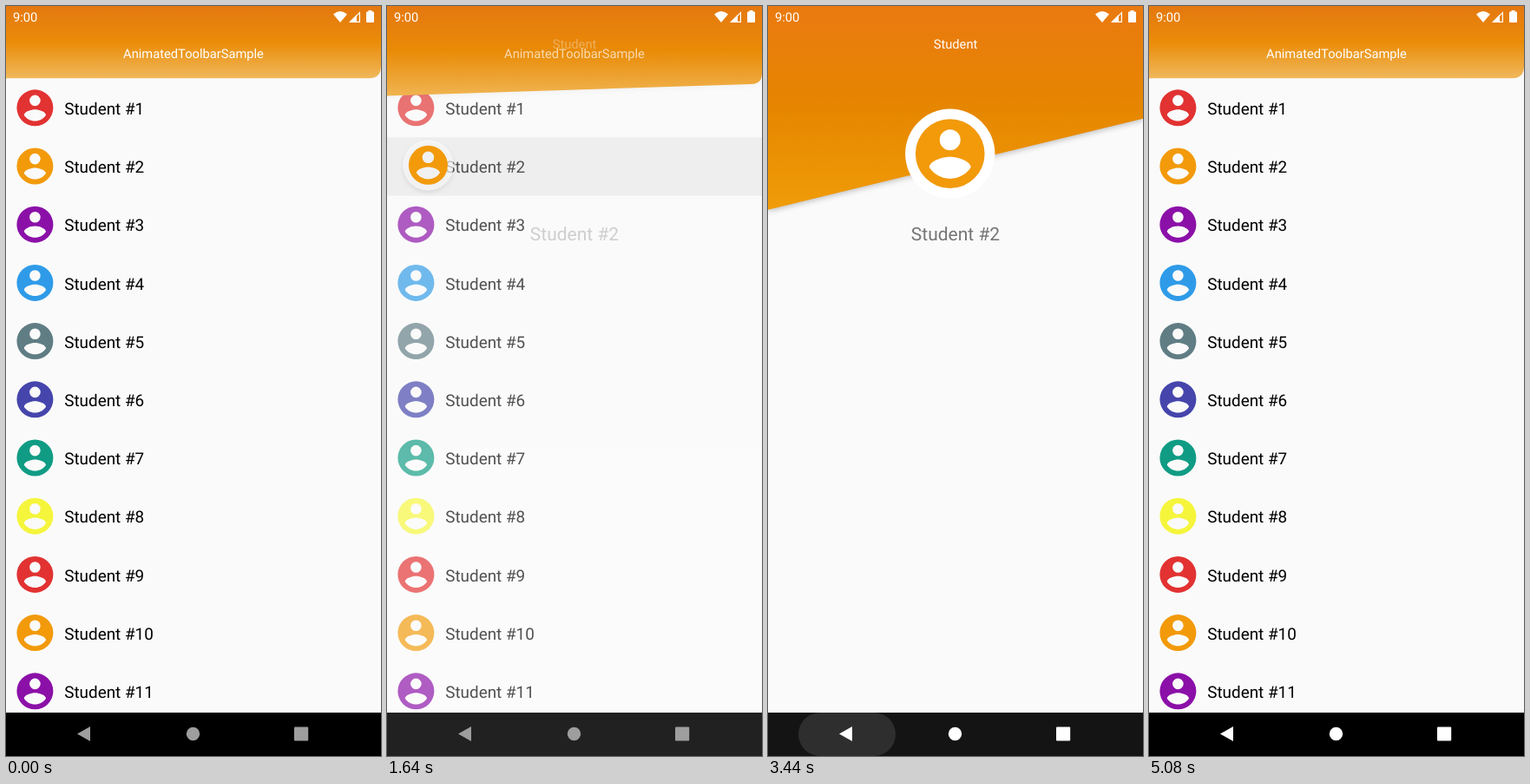
An HTML page for the animation above (5120 ms loop, 432 by 864 pixels).

```html
<!DOCTYPE html>
<html lang="en">
<head>
<meta charset="utf-8">
<title>Animated toolbar</title>
<style>
  html, body { margin: 0; width: 100%; height: 100%; overflow: hidden; background: #000; }
  svg { display: block; width: 100%; height: 100%; }
  text { font-family: Roboto, "Noto Sans", sans-serif; text-rendering: geometricPrecision; }
  .mid { text-anchor: middle; }
  .bar { font-size: 14.7px; fill: #fff; }
</style>
</head>
<body>
<svg viewBox="0 0 432 864" xmlns="http://www.w3.org/2000/svg">
  <defs>
    <linearGradient id="paint" x1="0" y1="0" x2="0" y2="1">
      <stop id="top"/><stop id="middle" offset=".5"/><stop id="bottom" offset="1"/>
    </linearGradient>
    <filter id="headerBlur" x="-10%" y="-20%" width="120%" height="140%"><feGaussianBlur stdDeviation="3"/></filter>
    <filter id="avatarBlur" x="-30%" y="-30%" width="160%" height="160%"><feGaussianBlur stdDeviation="1.2"/></filter>
    <clipPath id="rowClip"><rect y="151.2" width="432" height="67.2"/></clipPath>
    <path id="person" fill-rule="evenodd" d="M0-10A10 10 0 1 1 0 10A10 10 0 1 1 0-10ZM0-7A3 3 0 1 0 0-1A3 3 0 1 0 0-7ZM0 7.2C2.5 7.2 4.71 5.92 6 3.98C5.97 1.99 1.99.9 0 .9C-2 .9-5.97 1.99-6 3.98C-4.71 5.92-2.5 7.2 0 7.2Z"/>
  </defs>

  <rect width="432" height="864" fill="#fafafa"/>
  <g clip-path="url(#rowClip)"><circle id="ripple"/></g>
  <g id="rows"></g>

  <g id="detail">
    <rect width="432" height="864" fill="#fafafa"/>
    <text class="mid" x="216" y="269.6" font-size="21" fill="#757575">Student #2</text>
  </g>

  <path id="headerShade" fill="#555" filter="url(#headerBlur)" transform="translate(0 2)"/>
  <path id="header" fill="url(#paint)"/>
  <text id="listTitle" class="bar mid" x="216" y="60">AnimatedToolbarSample</text>
  <text id="pageTitle" class="bar mid" x="216" y="49">Student</text>

  <g id="avatar">
    <circle id="avatarShade" cy="1" r="13" fill="#444" filter="url(#avatarBlur)"/>
    <circle id="ring" r="12.95" fill="#fff"/>
    <use href="#person" fill="#f29a0a"/>
  </g>

  <rect y="814" width="432" height="50"/>
  <rect id="haze" y="814" width="432" height="50" fill="#fff"/>

  <text class="bar" x="8" y="18">9:00</text>
  <g fill="#fff">
    <path d="M377 9.4Q385 2.4 393 9.4L385 19Z"/>
    <path d="M395 19L404 10V19Z"/>
    <path d="M396.8 18.4H407.4V7.6Z" fill="none" stroke="#fff" stroke-width="1.2"/>
    <path d="M415 7.5Q415 6.6 416 6.6H417.5V5H421.5V6.6H423Q424 6.6 424 7.5V18Q424 19 423 19H416Q415 19 415 18Z"/>
  </g>

  <rect id="press" y="814" height="50" rx="25" fill="#fff"/>
  <g id="nav">
    <path d="M82 838.5L97 830V847Z"/>
    <circle cx="215.5" cy="838.5" r="7.7"/>
    <rect x="332" y="830.5" width="16.2" height="16" rx="1"/>
  </g>
</svg>
<script>
const LOOP = 5120, ROW = 67.2;
const OPEN = 1593, CLOSE = 3408, MORPH = 300, LAG = 36;
const TAP = 1330, BACK = 3290;
const COLORS = ['#e23232', '#f29a0a', '#8b10a8', '#2f9be8', '#607d84', '#4545ac', '#109c84', '#f5f53c'];

const $ = id => document.getElementById(id);
const set = (id, attrs) => {
  for (const k in attrs) $(id).setAttribute(k, attrs[k]);
};
const ramp = (t, start, length) => Math.min(1, Math.max(0, (t - start) / length));
const mix = (a, b, p) => a + (b - a) * p;
const blend = (a, b, p) => `rgb(${a.map((v, i) => mix(v, b[i], p))})`;

// cubic-bezier(.4, 0, .2, 1)
function ease(x) {
  let lo = 0, hi = 1, s = x;
  for (let i = 0; i < 24; i++) {
    s = (lo + hi) / 2;
    const u = 1 - s;
    if (1.2 * u * u * s + 0.6 * u * s * s + s ** 3 < x) lo = s; else hi = s;
  }
  return x <= 0 ? 0 : x >= 1 ? 1 : s * s * (3 - 2 * s);
}

// 0 on the list, 1 on the student page
const shown = (t, open, close, length) =>
  t < CLOSE ? ramp(t, open, length) : 1 - ramp(t, close, length);
const shift = (t, open, close) =>
  t < CLOSE ? ease(ramp(t, open, MORPH)) : 1 - ease(ramp(t, close, MORPH));

function headerPath(p) {
  const left = mix(83.3, 234.7, p), right = mix(83.3, 129.7, p), c = 14 * (1 - p);
  const edge = right + (left - right) * c / 432;
  return `M0 0H432V${right - c}Q432 ${right} ${432 - c} ${edge}L0 ${left}Z`;
}

$('rows').innerHTML = Array.from({ length: 11 }, (_, i) => {
  const y = 117.3 + i * ROW;
  return `<use id="row${i + 1}" href="#person" fill="${COLORS[i % 8]}" transform="translate(33.4 ${y}) scale(2.1)"/>` +
    `<text x="67.2" y="${y + 7.6}" font-size="18.9">Student #${i + 1}</text>`;
}).join('');

function draw(t) {
  const move = shift(t, OPEN, CLOSE);
  const fold = shift(t, OPEN - 12, CLOSE + LAG);
  const fade = shown(t, OPEN - 13, CLOSE + LAG, 190);
  const bars = shown(t, OPEN - 13, CLOSE, 250);
  const opened = t >= OPEN && t < CLOSE + MORPH;

  // List row touch
  const grow = ease(ramp(t, TAP, 225));
  set('ripple', {
    cx: mix(185, 216, grow), cy: 184.8, r: mix(129, 219, grow),
    opacity: 0.1 * ramp(t, TAP - 10, 75) * (1 - ramp(t, OPEN, 150))
  });

  // Toolbar
  const d = headerPath(fold);
  set('header', { d });
  set('headerShade', { d, opacity: mix(0, 0.35, fold) });
  set('top', { 'stop-color': blend([228, 120, 16], [234, 122, 16], fold) });
  set('middle', { 'stop-color': blend([234, 140, 8], [230, 134, 0], fold) });
  set('bottom', { 'stop-color': blend([240, 184, 92], [240, 156, 8], fold) });
  set('listTitle', { opacity: 1 - fade });
  set('pageTitle', { opacity: fade });
  set('detail', { opacity: fade });

  // Shared avatar
  set('avatar', {
    transform: `translate(${mix(33.4, 215.6, move)} ${mix(184.5, 169.7, move)}) scale(${mix(2.1, 4.05, move)})`,
    visibility: opened ? 'visible' : 'hidden'
  });
  set('row2', { visibility: opened ? 'hidden' : 'visible' });
  set('ring', { opacity: Math.min(1, fade * 2) });
  set('avatarShade', { opacity: t < CLOSE ? 0.35 * fade : 0 });

  // Navigation bar
  const w = mix(50, 112, ease(ramp(t, BACK, 120)));
  set('haze', { opacity: 0.7 * bars * (1 - bars) });
  set('press', {
    x: 91 - w / 2, width: w,
    opacity: 0.11 * ramp(t, BACK, 60) * (1 - ramp(t, 3460, 180))
  });
  set('nav', { fill: t < BACK ? '#9e9e9e' : '#fff' });
}

function tick() {
  draw(performance.now() % LOOP);
  requestAnimationFrame(tick);
}
tick();
</script>
</body>
</html>
```
